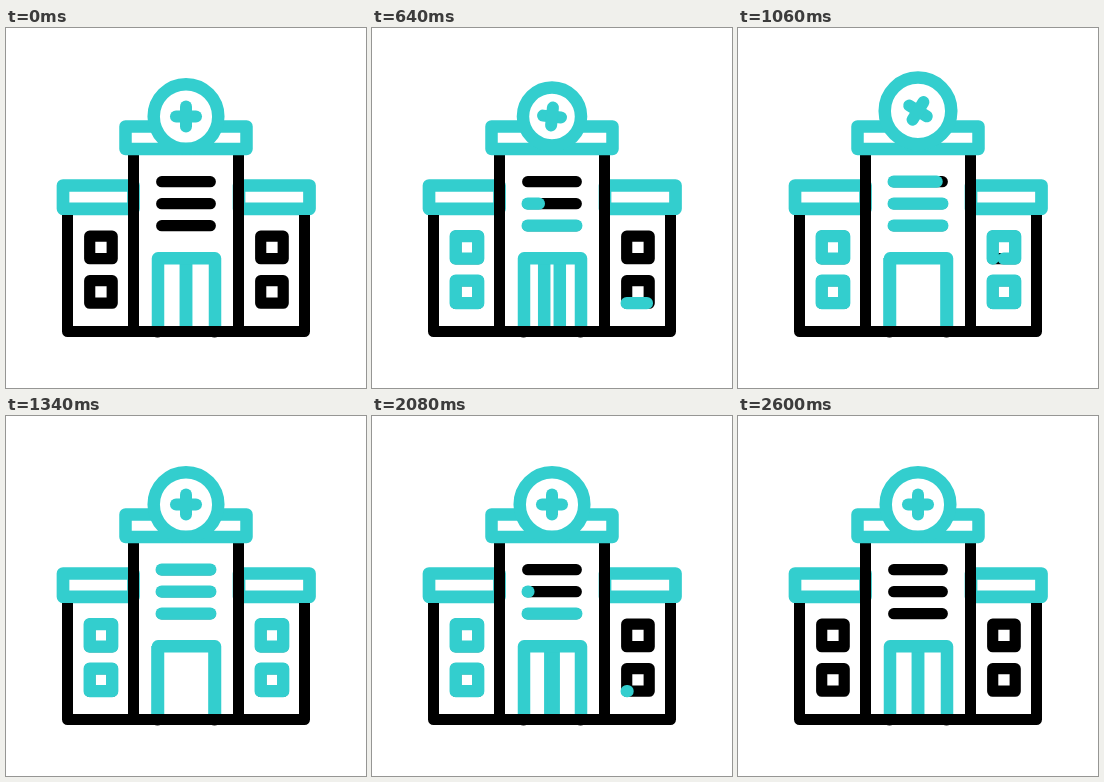
Write an HTML page with a canvas that moves like this. It is 360 by 360 pixels and loops after 2820 ms.

```html
<!DOCTYPE html>
<html lang="en">
<head>
<meta charset="utf-8">
<title>Hospital</title>
<style>
html, body { margin: 0; width: 100%; height: 100%; overflow: hidden; background: #fff; }
canvas { display: block; width: 360px; height: 360px; }
</style>
</head>
<body>
<canvas id="stage" width="360" height="360"></canvas>
<script>
const ctx = document.getElementById('stage').getContext('2d');
const TEAL = '#33cece', BLACK = '#000';
const CENTER = 180;
const LOOP = 2820, MIRROR = 2678, STEP = 205;

// Progress of one step, from 0 to 1.
const progress = (t, start) => Math.max(0, Math.min(1, (t - start) / STEP));

// Smooth pulse: 1 at the peak, 0 beyond the half width.
const pulse = (t, peak, half) =>
  (1 + Math.cos(Math.PI * Math.min(1, Math.abs(t - peak) / half))) / 2;

function stroke(points, color, width, cap = 'round') {
  ctx.strokeStyle = color;
  ctx.lineWidth = width;
  ctx.lineCap = cap;
  ctx.lineJoin = 'round';
  ctx.beginPath();
  points.forEach(([x, y]) => ctx.lineTo(x, y));
  ctx.stroke();
}

const vertical = (x, top, bottom, color, width) =>
  stroke([[x, top], [x, bottom]], color, width, 'butt');

// Closed rectangle, clockwise from the bottom left.
const box = (x, y, w, h) => [[x, y + h], [x, y], [x + w, y], [x + w, y + h], [x, y + h]];

// Black outline with a teal one growing over it.
function recolor(points, length, p) {
  stroke(points, BLACK, 11.2);
  if (p <= 0) return;
  if (p < 1) ctx.setLineDash([p * length, length * 2]);
  stroke(points, TEAL, 12.3);
  ctx.setLineDash([]);
}

function drawDoor(t) {
  const shift = 28.5 * progress(t, 585);
  for (const side of [-1, 1]) vertical(CENTER + side * shift, 230, 300, TEAL, 12.5);
  stroke([[152, 300], [152, 230.3], [209, 230.3], [209, 300]], TEAL, 12.5, 'butt');
}

function drawBuilding() {
  for (const x of [57, 233]) stroke(box(x, 157.5, 70.5, 23.3), TEAL, 12.7);
  stroke([[61.5, 187], [61.5, 303.5], [298.5, 303.5], [298.5, 187]], BLACK, 11, 'butt');
  for (const side of [-1, 1]) {
    vertical(CENTER + side * 52.5, 126, 303, BLACK, 11);
    const foot = [CENTER + side * 28.5, 304];
    stroke([foot, foot], BLACK, 11);
  }
  stroke(box(119.5, 98.5, 121, 22.5), TEAL, 12.5);
}

function drawWindows(t) {
  const side = 22.5;
  [180, 385, 595, 881].forEach((start, i) => {
    const right = i > 1, upper = i % 2;
    const points = box(right ? 254.7 : 83.7, upper ? 208.2 : 252.7, side, side);
    if (right && !upper) points.reverse();
    recolor(points, side * 4, progress(t, start));
  });
}

function drawLines(t) {
  for (let i = 0; i < 3; i++) {
    const y = 197.7 - 22 * i;
    recolor([[155.7, y], [204.3, y]], 48.6, progress(t, 308 + 286 * i));
  }
}

// The sign dips and shrinks, then jumps up, grows and settles.
function drawSign(t) {
  const dip = pulse(t, 450, 450), rise = pulse(t, 890, 430);
  const radius = 32.3 - 6.2 * dip + 1.5 * rise;
  const arm = 0.31 * radius;
  ctx.save();
  ctx.translate(CENTER, 88.5 + 5.2 * dip - 8.5 * rise);
  ctx.beginPath();
  ctx.arc(0, 0, radius, 0, 2 * Math.PI);
  ctx.fillStyle = '#fff';
  ctx.fill();
  ctx.strokeStyle = TEAL;
  ctx.lineWidth = 12.5;
  ctx.stroke();
  ctx.rotate((48 * rise - 20 * dip) * Math.PI / 180);
  stroke([[-arm, 0], [arm, 0]], TEAL, 12);
  stroke([[0, -arm], [0, arm]], TEAL, 12);
  ctx.restore();
}

function draw(now) {
  const t = now % LOOP;
  const there = Math.min(t, MIRROR - t); // plays forward, then back
  ctx.fillStyle = '#fff';
  ctx.fillRect(0, 0, 360, 360);
  drawDoor(there);
  drawBuilding();
  drawWindows(there);
  drawLines(there);
  drawSign(t);
}

function tick() {
  draw(performance.now());
  requestAnimationFrame(tick);
}
tick();
</script>
</body>
</html>
```
